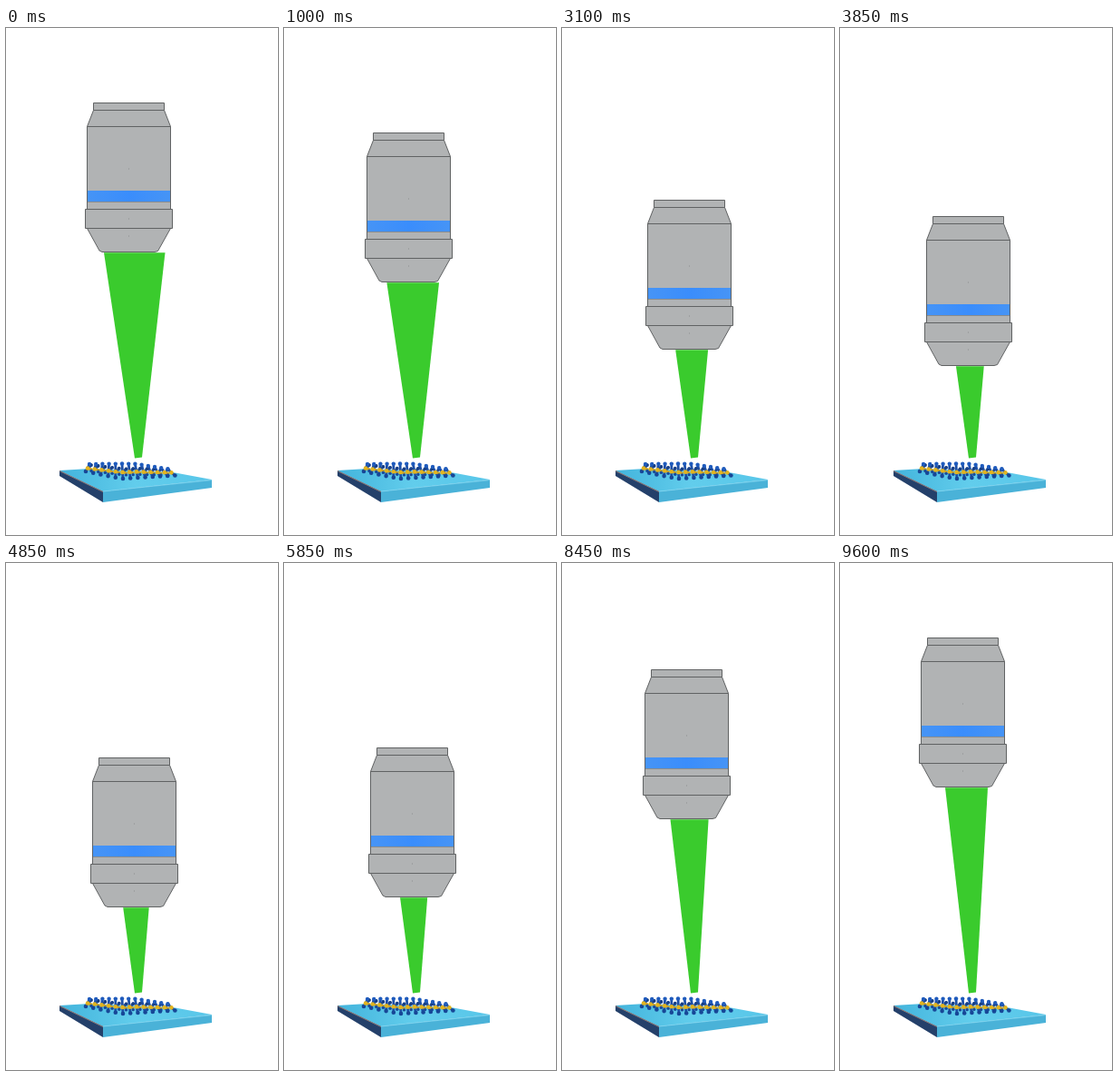
An HTML page for the animation above (9.65 s loop, 300x558 px).

```html
<!DOCTYPE html>
<html lang="en">
<head>
<meta charset="utf-8">
<title>Objective focusing on a crystal sheet</title>
<style>
  html, body { margin: 0; width: 100%; height: 100%; overflow: hidden; background: #fff; }
  svg { display: block; width: 300px; height: 558px; }
</style>
</head>
<body>
<svg viewBox="0 0 300 558">
  <defs>
    <linearGradient id="band">
      <stop offset="0" stop-color="#4694f6"/>
      <stop offset=".5" stop-color="#3a8dfc"/>
      <stop offset="1" stop-color="#4694f6"/>
    </linearGradient>
    <linearGradient id="top">
      <stop offset="0" stop-color="#43b4dc"/>
      <stop offset=".5" stop-color="#62cdec"/>
      <stop offset="1" stop-color="#58c6e9"/>
    </linearGradient>
  </defs>

  <path fill="url(#top)" d="M59 487L92 485L184 489L227 497L107 510Z"/>
  <path fill="#24406a" d="M59 487L107 510V522L59 493Z"/>
  <path fill="#4ab2d8" d="M107 510L227 497V506L107 522Z"/>
  <path fill="none" stroke="#8b7a78" d="M59 487.500L107 510.500"/>
  <path fill="none" stroke="#7fd6f0" stroke-width=".8" d="M107 510L227 497.500"/>
  <g id="lattice" stroke-linecap="round"></g>

  <path id="beam" fill="#3acb2d"/>
  <g id="lens" fill="#b1b3b4" stroke="#606263">
    <path d="M96.500 .5H174.500V8.500H96.500Z"/>
    <path d="M96.500 8.500H174.500L181.500 26.500H89.500Z"/>
    <path d="M89.500 26.500H181.500V117.500H89.500Z"/>
    <path d="M90 97H181V109.500H90Z" fill="url(#band)" stroke="none"/>
    <path d="M90 109.500H181" stroke="#8a8c8d"/>
    <path d="M89.500 138.500H181.500L167.500 163.500L164 164.500H106L103 163Z"/>
    <path d="M87.500 117.500H183.500V138.500H87.500Z"/>
    <path d="M135 73h1M135 128h1M135 147h1" stroke="#8c8e8f"/>
  </g>
</svg>
<script>
const LOOP = 9650, TURN = 4.75, HIGH = 82, LOW = 214.4;
const find = id => document.getElementById(id);
const mix = (a, b, k) => a + (b - a) * k;

function buildLattice() {
  const ball = (x, y, r, color) => `<circle cx="${x}" cy="${y}" r="${r}" fill="${color}"/>`;
  const rod = (x1, y1, x2, y2, color) =>
    `<path d="M${x1} ${y1}L${x2} ${y2}" stroke="${color}" stroke-width="2.8"/>`;
  let rods = "", balls = "";
  for (let i = 0; i <= 12; i++) {
    const x = 90 + i * 7.7;
    const lean = (4 - i) * 0.5;
    const top = 479.5 + Math.abs(i - 5) * 0.1 + Math.max(0, i - 7);
    const bottom = i < 5 ? 488 + i * 1.7 : 496 - (i - 5) * 0.5;
    const middle = mix(top, bottom, 0.57);
    rods += rod(x + lean, top, x, middle, "#1e50a6") + rod(x, middle, x - lean, bottom, "#1e50a6");
    if (i < 12) {
      rods += rod(x + 4, middle - 4, x + 1, middle, "#24529c");
      rods += rod(x + 4, middle + 1, x, middle, "#c9a12a");
      balls += ball(x + 4, middle - 3.5, 1.9, "#173f86") + ball(x + 4, middle + 3, 1.7, "#1b4a98");
    }
    balls += ball(x + lean, top, 2.2, "#1f5bbd") + ball(x - lean, bottom, 2.3, "#174797");
    balls += ball(x, middle, 2.3, "#e3b41f");
  }
  find("lattice").innerHTML = rods + balls;
}

// Height of the lens top, t seconds into the descent: steady start, then a cosine
function lensTop(t) {
  if (t < 0.8) return HIGH + 33 * Math.max(0, t);
  return LOW - 71.6 * (1 - Math.cos((TURN - t) * Math.PI / 6));
}

function draw(now) {
  const t = (now % LOOP) / 1000;
  const falling = t < TURN;
  const y = lensTop(falling ? t : 2 * TURN - t);
  const depth = (y - HIGH) / (LOW - HIGH);
  const left = mix(falling ? 108 : 116, 129.2, depth);
  const right = mix(falling ? 175.5 : 163, 157.7, depth);
  const lensY = Math.round(y);
  const edge = lensY + 165.2;
  find("lens").setAttribute("transform", `translate(${Math.round(depth * 6.3)} ${lensY})`);
  find("beam").setAttribute("d", `M${left} ${edge}H${right}L150 472.500L142 473.500Z`);
  requestAnimationFrame(() => draw(performance.now() - start));
}

buildLattice();
const start = performance.now();
draw(0);
</script>
</body>
</html>
```
